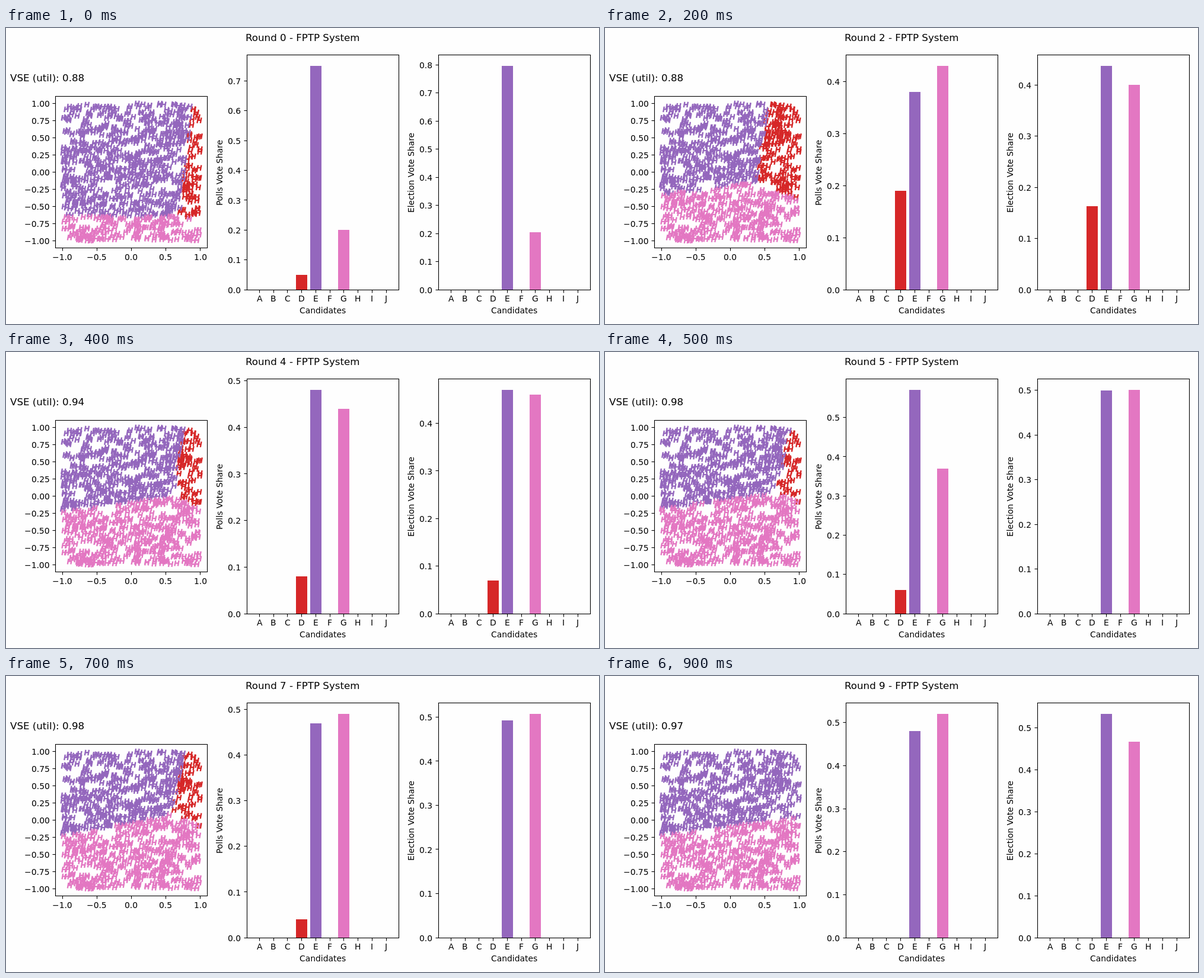
An HTML page that plays this animation: 1000x500 px, repeating every 1 s.

```html
<!DOCTYPE html>
<html lang="en">
<head>
<meta charset="utf-8">
<title>Voting rounds</title>
<style>
  html, body { margin: 0; width: 100%; height: 100%; overflow: hidden; background: #fefefe; }
  svg { display: block; width: 1000px; height: 500px; }
  text { font: 13.89px "DejaVu Sans", Verdana, sans-serif; fill: #000; white-space: pre; }
  .title { font-size: 16.67px; }
  .axis { fill: none; stroke: #000; stroke-width: 1.1; }
  .bar { shape-rendering: crispEdges; }
  .voters { fill: none; stroke-width: 2.4; }
</style>
</head>
<body>
<svg id="stage" viewBox="0 0 1000 500"></svg>
<script>
const stage = document.getElementById('stage');
const COLORS = { D: '#d62728', E: '#9467bd', G: '#e377c2' };
const LETTERS = [...'ABCDEFGHIJ'];
const ROUND_MS = 100;

// polls and election: shares of D and E, G takes the rest.
// areas: left y of the G border, meeting point x and y, right y of the G border, top x of the D border.
const rounds = [
  { vse: 0.88, polls: [.05, .75], election: [0, .796],      areas: [319, 292, 317, 327, 317] },
  { vse: 0.87, polls: [.07, .56], election: [0, .695],      areas: [304, 304, 283, 291, 313] },
  { vse: 0.88, polls: [.19, .38], election: [.163, .437],   areas: [282, 255, 261, 290, 277] },
  { vse: 0.9,  polls: [.06, .44], election: [.12, .45],     areas: [279, 273, 250, 270, 288] },
  { vse: 0.94, polls: [.08, .48], election: [.07, .47],     areas: [271, 281, 244, 263, 301] },
  { vse: 0.98, polls: [.06, .57], election: [0, .4995],     areas: [264, 290, 238, 256, 314] },
  { vse: 0.98, polls: [.05, .52], election: [0, .496],      areas: [267, 286, 235, 256, 308] },
  { vse: 0.98, polls: [.04, .47], election: [0, .493],      areas: [270, 281, 233, 256, 302] },
  { vse: 0.98, polls: [.02, .48], election: [0, .513],      areas: [270, 306, 234, 247, 322] },
  { vse: 0.97, polls: [0, .48],   election: [0, .533],      areas: [270, 340, 236, 236, 420] }
];

function add(name, attrs, parent = stage, content = '') {
  const node = document.createElementNS('http://www.w3.org/2000/svg', name);
  for (const key in attrs) node.setAttribute(key, attrs[key]);
  node.textContent = content;
  return parent.appendChild(node);
}

// Text starts on a whole pixel; align is 0 for left, .5 for centre, 1 for right.
function label(content, x, y, align = .5, parent = stage) {
  const node = add('text', { y }, parent, content);
  node.setAttribute('x', Math.round(x - align * node.getComputedTextLength()));
  return node;
}

const snap = v => Math.floor(v) + .5;

function xTick(x, y, content) {
  add('path', { class: 'axis', d: `M${snap(x)} ${snap(y)}v5` });
  label(content, x, Math.round(y + 20));
}

function yTick(x, y, content, parent) {
  add('path', { class: 'axis', d: `M${snap(x)} ${snap(y)}h-5` }, parent);
  label(content, snap(x) - 10, Math.round(y + 5.7), 1, parent);
}

// Voters: seeded uniform points, kept out of a few sparse spots.
function makeVoters(count) {
  let seed = 4127;
  const random = () => {
    seed = (seed + 0x6D2B79F5) | 0;
    let t = Math.imul(seed ^ (seed >>> 15), 1 | seed);
    t = (t + Math.imul(t ^ (t >>> 7), 61 | t)) ^ t;
    return ((t ^ (t >>> 14)) >>> 0) / 4294967296;
  };
  const gaps = [
    [194, 126, 18, 9], [152, 160, 13, 8], [288, 236, 12, 9], [128, 238, 9, 13],
    [140, 328, 18, 9], [320, 171, 10, 9], [112, 166, 12, 8], [270, 266, 12, 8]
  ];
  const voters = [];
  while (voters.length < count) {
    const x = 95 + 232.6 * random(), y = 127.5 + 232 * random();
    if (gaps.every(([cx, cy, rx, ry]) => ((x - cx) / rx) ** 2 + ((y - cy) / ry) ** 2 > 1)) {
      voters.push([x, y]);
    }
  }
  return voters;
}

const mix = (a, b, t) => a + (b - a) * t;

function choice([x, y], [leftY, meetX, meetY, rightY, topX]) {
  const border = x < meetX
    ? mix(leftY, meetY, (x - 95) / (meetX - 95))
    : mix(meetY, rightY, (x - meetX) / (330 - meetX));
  if (y > border) return 'G';
  return x > mix(topX, meetX, (y - 115) / (meetY - 115)) ? 'D' : 'E';
}

// A slanted H centred on the voter.
const mark = ([x, y]) =>
  `M${(x - 3.6).toFixed(1)} ${(y + 4.7).toFixed(1)}l1.7-9.4m5.5 0l-1.7 9.4m.85-4.9h-5.5`;

const voters = makeVoters(1000);
for (const round of rounds) {
  round.paths = { D: '', E: '', G: '' };
  for (const voter of voters) round.paths[choice(voter, round.areas)] += mark(voter);
}

const heading = label('Round 0 - FPTP System', 500, 22);
const score = label('', 7, 90, 0);
heading.setAttribute('class', 'title');
heading.setAttribute('x', Math.round(500 - heading.getComputedTextLength() / 2));
score.setAttribute('class', 'title');

const crowd = {};
for (const key in COLORS) crowd[key] = add('path', { class: 'voters', stroke: COLORS[key] });
add('rect', { class: 'axis', x: 83.5, y: 115.5, width: 256, height: 256 });
const signed = (v, digits) => v.toFixed(digits).replace('-', '\u2212');
for (let v = -1; v <= 1; v += .25) {
  yTick(83.5, 243.3 - 116.3 * v, signed(v, 2));
  if (v % .5 === 0) xTick(211.3 + 116.3 * v, 371.5, signed(v, 1));
}

function makeChart(left, name) {
  const top = 45.3, bottom = 442, width = 256, height = bottom - top;
  const unit = width / 10.78;
  const center = i => left + (i + .89) * unit;
  const bars = {};
  for (const key in COLORS) {
    bars[key] = add('rect', {
      class: 'bar', fill: COLORS[key], width: .8 * unit,
      x: center(LETTERS.indexOf(key)) - .4 * unit
    });
  }
  add('rect', { class: 'axis', x: snap(left), y: snap(top), width, height: snap(bottom) - snap(top) });
  LETTERS.forEach((letter, i) => xTick(center(i), bottom, letter));
  label('Candidates', left + width / 2, 482);
  const side = add('g', { transform: `translate(${Math.floor(left) - 41} 244) rotate(-90)` });
  label(name, 0, 0, .5, side);
  const ticks = add('g', {});

  return ([d, e]) => {
    const shares = { D: d, E: e, G: 1 - d - e };
    const limit = 1.05 * Math.max(...Object.values(shares));
    const toY = v => bottom - v / limit * height;
    for (const key in bars) {
      const y = toY(shares[key]);
      bars[key].setAttribute('y', y);
      bars[key].setAttribute('height', Math.max(0, bottom - y));
    }
    ticks.replaceChildren();
    for (let i = 0; i / 10 <= limit; i++) yTick(left, toY(i / 10), (i / 10).toFixed(1), ticks);
  };
}

const showPolls = makeChart(406.25, 'Polls Vote Share');
const showElection = makeChart(729.25, 'Election Vote Share');

let shown = -1;
function render(time) {
  const index = Math.floor(time / ROUND_MS) % rounds.length;
  if (index === shown) return;
  shown = index;
  const round = rounds[index];
  heading.textContent = `Round ${index} - FPTP System`;
  score.textContent = `VSE (util): ${round.vse}`;
  for (const key in crowd) crowd[key].setAttribute('d', round.paths[key]);
  showPolls(round.polls);
  showElection(round.election);
}

function tick() {
  render(performance.now());
  requestAnimationFrame(tick);
}
render(0);
requestAnimationFrame(tick);
</script>
</body>
</html>
```
